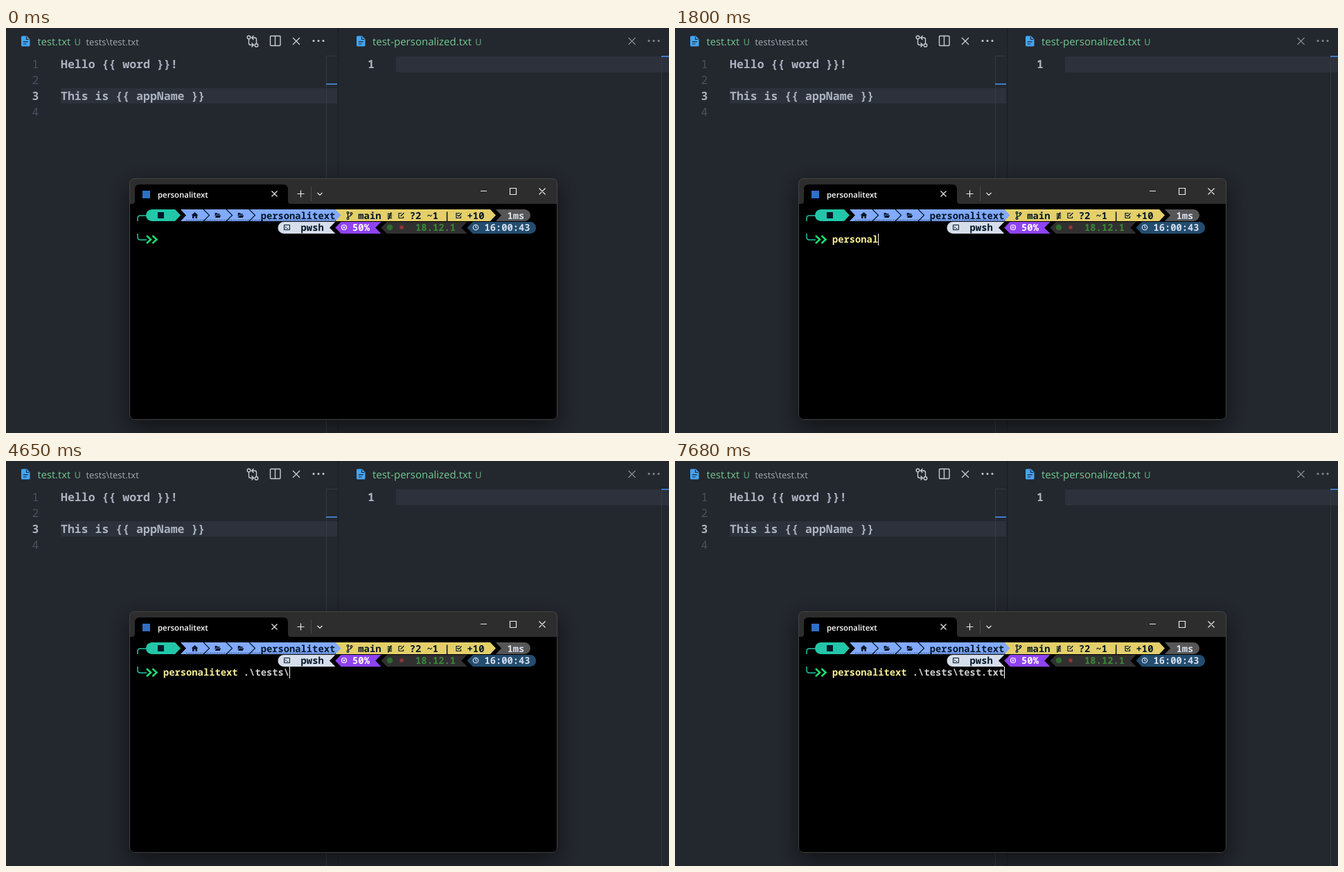
An HTML page that plays this animation: 957 by 585 pixels, repeating every 8 s.

```html
<!DOCTYPE html>
<html lang="en">
<head>
<meta charset="utf-8">
<title>Typing a command</title>
<style>
  html, body { margin: 0; height: 100%; overflow: hidden; background: #23272e; }
  svg { display: block; width: 100vw; height: 100vh; }
  text { white-space: pre; text-rendering: geometricPrecision; }
  .ui { font: 15px "Open Sans", "Noto Sans", sans-serif; fill: #73c991; }
  .small { font-size: 13.1px; }
  .mark { font-size: 13px; font-weight: 600; fill: #538d6c; }
  .code { font: 600 16.55px "Noto Sans Mono", "DejaVu Sans Mono", monospace; fill: #abb2bf; }
  .dim { fill: #495162; font-weight: 500; }
  .term { font: 600 13.792px "Noto Sans Mono", "DejaVu Sans Mono", monospace; }
  .line { fill: none; stroke-width: 1.2; }
</style>
</head>
<body>
<svg viewBox="0 0 957 585">
  <defs>
    <g id="file">
      <path d="M1.5 0H8L12.5 4.700V13.500Q12.500 15 11 15H1.500Q0 15 0 13.500V1.500Q0 0 1.500 0Z" fill="#42a5f5"/>
      <path d="M7.500 1V5H11.500M2.800 8.300H9.700M2.800 11.500H7.500" class="line" stroke="#23272e"/>
    </g>
    <path id="cross" d="M-5-5L5 5M5-5L-5 5"/>
    <g id="dots"><circle cx="-7" r="1.500"/><circle r="1.500"/><circle cx="7" r="1.500"/></g>
    <path id="folder" d="M-4-3.500H-1L0-2.300H3V-.8H-2.300L-4 2.500ZM-2 0H4.700L3 3.500H-3.700Z"/>
    <path id="divider" d="M0 0L8.500 8.500L0 17" class="line" stroke="#011627"/>
    <filter id="shadow" x="-20%" y="-30%" width="140%" height="160%">
      <feDropShadow dx="0" dy="10" stdDeviation="16" flood-color="#000" flood-opacity=".55"/>
    </filter>
  </defs>

  <!-- Editors -->
  <rect width="957" height="585" fill="#23272e"/>
  <path d="M79 87H478V109H79ZM563 41H957V64H563Z" fill="#2c313c"/>
  <path d="M479.500 0V585" stroke="#1b1e24"/>
  <path d="M478 40.500H462.500V585M946.500 40V585" fill="none" stroke="#353a43"/>
  <path d="M462 81H478M946 41H957" stroke="#3f7cc4" stroke-width="2"/>

  <use href="#file" x="22" y="11.500"/>
  <use href="#file" x="506" y="11.500"/>
  <g class="ui">
    <text x="45.500" y="25" style="font-size:14.700px">test.txt</text>
    <text x="529" y="25">test-personalized.txt</text>
    <text x="98.500" y="24.500" class="mark">U</text>
    <text x="677" y="24.500" class="mark">U</text>
    <text x="115.500" y="24.500" class="small" fill="#a5abb5">tests\test.txt</text>
  </g>

  <g stroke="#c8ccd2" fill="none" stroke-width="1.400">
    <circle cx="350.500" cy="13.500" r="2.300"/>
    <circle cx="361.500" cy="25" r="2.300"/>
    <path d="M350.500 16V22Q350.500 24.500 353 24.500H357M354.500 21.500L357.500 24.500L354.500 27.500M361.500 22.500V16.500Q361.500 14 359 14H355M357.500 11L354.500 14L357.500 17"/>
    <rect x="381.500" y="11.500" width="14.500" height="14" rx="1"/>
    <path d="M388.500 11.500V25.500"/>
    <use href="#cross" x="419" y="19"/>
  </g>
  <use href="#dots" x="451" y="18.500" fill="#c8ccd2"/>
  <use href="#cross" x="903.500" y="19" stroke="#858990" stroke-width="1.300"/>
  <use href="#dots" x="935" y="18.500" fill="#858990"/>

  <g class="code">
    <text x="37.500" y="58" class="dim">1</text>
    <text x="37.500" y="81" class="dim">2</text>
    <text x="37.500" y="104">3</text>
    <text x="37.500" y="127" class="dim">4</text>
    <text x="79" y="58">Hello {{ word }}!</text>
    <text x="79" y="104">This is {{ appName }}</text>
    <text x="522" y="58">1</text>
  </g>

  <!-- Terminal window -->
  <rect x="178" y="217" width="618" height="349" rx="7" fill="#000" filter="url(#shadow)"/>
  <path d="M178 254V224Q178 217 185 217H789Q796 217 796 224V254Z" fill="#2d2d2d"/>
  <path d="M182 254Q186 254 186 250V233Q186 226 193 226H400Q407 226 407 233V250Q407 254 411 254Z"/>
  <rect x="178.500" y="217.500" width="617" height="348" rx="7" fill="none" stroke="#444"/>
  <rect x="197" y="235" width="11" height="11" fill="#2f6fc6"/>
  <text x="219" y="245" class="ui" style="font-size:11.400px;font-weight:600;fill:#fff">personalitext</text>
  <path d="M440.500 229V250" stroke="#4a4a4a"/>
  <g stroke="#e8e8e8" class="line">
    <path d="M383.500 235.500L391.500 243.500M391.500 235.500L383.500 243.500M420.500 239.500H430.500M425.500 234.500V244.500M449.500 238L453 241.500L456.500 238"/>
    <path d="M685 235.500H694M727.500 231.500H736.500V240.500H727.500ZM769.500 231.500L778.500 240.500M778.500 231.500L769.500 240.500"/>
  </g>

  <!-- Prompt, first row -->
  <g stroke="#21c7a8" fill="none" stroke-width="1.500">
    <path d="M190 279V275Q190 271 194 271H203"/>
    <path d="M190 297V302Q190 306 194 306H203"/>
  </g>
  <path d="M210.500 262H244L252 270.500L244 279H210.500A8.500 8.500 0 0 1 210.500 262Z" fill="#21c7a8"/>
  <path d="M476 262H699L707 270.500L699 279H476Z" fill="#e4cf6a"/>
  <path d="M252 262H475.500L483.500 270.500L475.500 279H252L260 270.500Z" fill="#82aaff"/>
  <path d="M707 262H748.500A8.500 8.500 0 0 1 748.500 279H707L715 270.500Z" fill="#575656"/>
  <path d="M260 277.500H476" stroke="#011627" stroke-dasharray="1 1.500"/>
  <g fill="#011627">
    <rect x="219" y="266" width="9" height="9"/>
    <path d="M267.500 270.500L272.500 266L277.500 270.500H276V275H273.500V272H271.500V275H269V270.500Z"/>
    <use href="#folder" x="305.600" y="270.500"/>
    <use href="#folder" x="338.700" y="270.500"/>
    <use href="#divider" x="285" y="262"/>
    <use href="#divider" x="318" y="262"/>
    <use href="#divider" x="351" y="262"/>
  </g>
  <g class="line" stroke="#011627">
    <circle cx="493.500" cy="267" r="1.400"/>
    <circle cx="493.500" cy="275" r="1.400"/>
    <circle cx="498.500" cy="268" r="1.400"/>
    <path d="M493.500 268.500V273.500M498.500 269.500Q498.500 271.500 493.500 272.500"/>
    <path d="M571 267.500H567V274.500H573.500V272M569.500 272L574.500 267"/>
    <path d="M655 267.500H650V274.500H656.500V271.500M651.500 270L653.500 272L657.500 267.500"/>
  </g>
  <g class="term" fill="#011627">
    <text x="367.700" y="275.500">personalitext</text>
    <text x="508.350" y="275.500">main ≢</text>
    <text x="582.800" y="275.500">?2 ~1 |</text>
    <text x="665.600" y="275.500">+10</text>
    <text x="723.500" y="275.500" fill="#d6deeb">1ms</text>
  </g>

  <!-- Prompt, second row -->
  <path d="M401 280H475.300L467 288.500L475.300 297H401A8.500 8.500 0 0 1 401 280Z" fill="#d6deeb"/>
  <path d="M483.500 280H541.500L533.200 288.500L541.500 297H483.500L475.300 288.500Z" fill="#8f43f3"/>
  <path d="M549.800 280H665.600L657.300 288.500L665.600 297H549.800L541.500 288.500Z" fill="#303030"/>
  <path d="M673.900 280H756.600A8.500 8.500 0 0 1 756.600 297H673.900L665.600 288.500Z" fill="#234d70"/>
  <g class="line">
    <path d="M401.500 284.500H409.500V291.500H401.500ZM403 286.500L404.500 288L403 289.500M405.500 289.500H407.500" stroke="#011627" stroke-width="1"/>
    <circle cx="488" cy="288" r="3.500" stroke="#fff"/>
    <path d="M486.500 288H489.500M488 286.500V289.500" stroke="#fff"/>
    <circle cx="678" cy="288" r="3.700" stroke="#d6deeb"/>
    <path d="M678 285.500V288L679.500 289" stroke="#d6deeb"/>
  </g>
  <circle cx="554" cy="288" r="4.300" fill="#2f6b2e"/>
  <rect x="568.500" y="285.500" width="5" height="5" fill="#9c3434"/>
  <g class="term">
    <text x="425.600" y="292.800" fill="#011627">pwsh</text>
    <text x="500.100" y="292.800" fill="#fff">50%</text>
    <text x="591.100" y="292.800" fill="#3c873a">18.12.1</text>
    <text x="690.400" y="292.800" fill="#d6deeb">16:00:43</text>
  </g>

  <!-- Command line -->
  <path d="M203 300L209 305.500L203 311M211.500 300L217.500 305.500L211.500 311" fill="none" stroke="#22da6e" stroke-width="2.600"/>
  <g class="term">
    <text id="command" x="227" y="310.200" fill="#f5ed96"></text>
    <text id="argument" x="342.850" y="310.200" fill="#ccc"></text>
  </g>
  <rect id="cursor" y="297" width="1" height="17" fill="#fff"/>
</svg>

<script>
const LOOP = 8000, START = 227, CELL = 8.275;
const COMMAND = "personalitext ";
const keyTimes = [40, 200, 380, 570, 880, 1270, 1430, 1800, 1990, 2190, 2320, 2680, 3100, 3520];
// Argument states; the jumps are tab completions.
const argumentStates = [
  [4100, "t"], [4280, "te"], [4650, ".\\tests\\"],
  [5670, ".\\tests\\t"], [6010, ".\\tests\\te"], [6370, ".\\tests\\tes"],
  [6950, ".\\tests\\test"], [7210, ".\\tests\\test."], [7680, ".\\tests\\test.txt"]
];
const cursorOff = [[0, 20], [5250, 5670]];

const [command, argument, cursor] =
  ["command", "argument", "cursor"].map(id => document.getElementById(id));

function draw() {
  const t = performance.now() % LOOP;
  const typed = COMMAND.slice(0, keyTimes.filter(time => time <= t).length);
  const state = argumentStates.filter(([time]) => time <= t).pop();
  const extra = state ? state[1] : "";
  command.textContent = typed;
  argument.textContent = extra;
  cursor.setAttribute("x", Math.round(START + CELL * (typed.length + extra.length)));
  const hidden = cursorOff.some(([from, to]) => t >= from && t < to);
  cursor.setAttribute("visibility", hidden ? "hidden" : "visible");
  requestAnimationFrame(draw);
}
draw();
</script>
</body>
</html>
```
